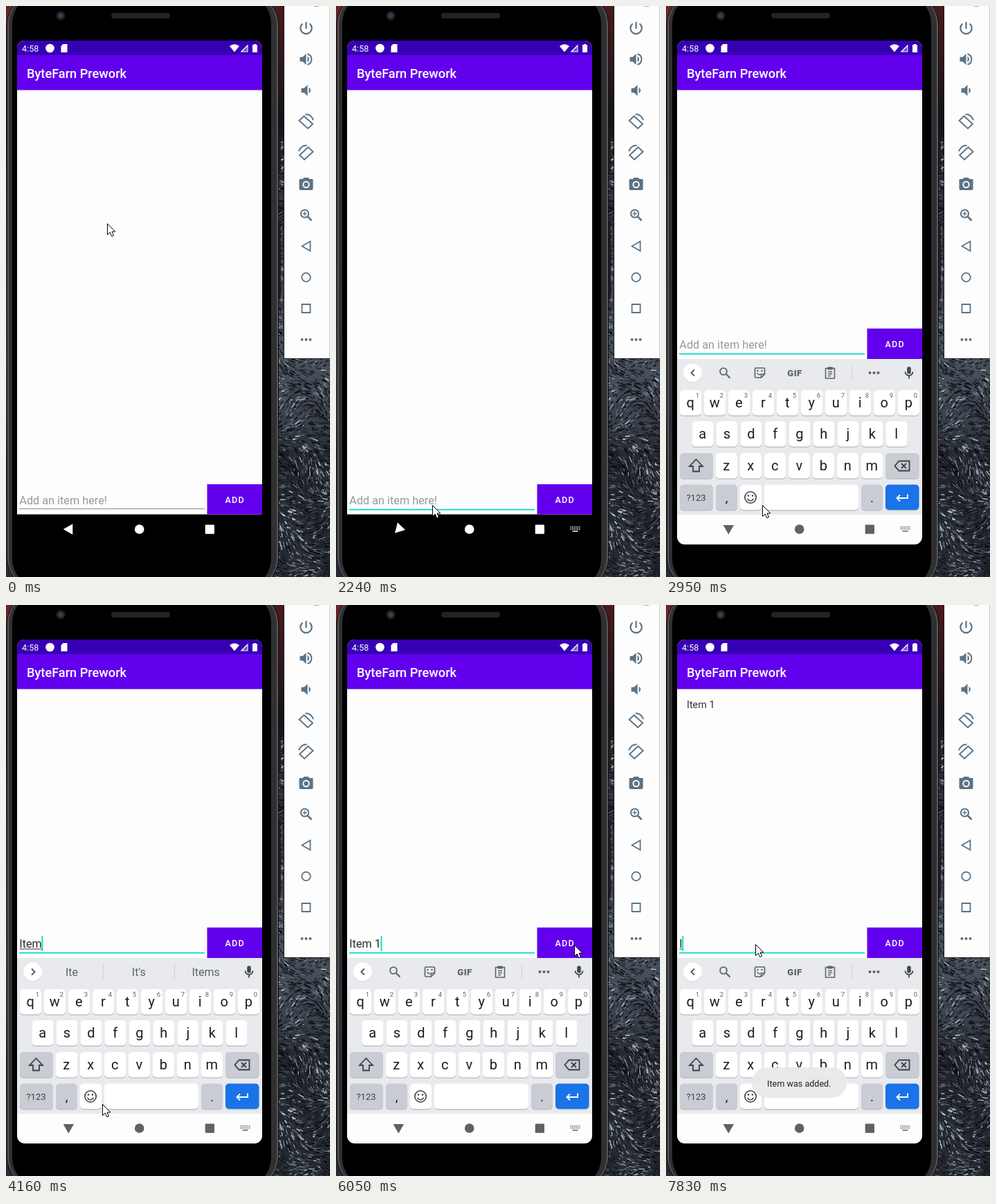
Recreate the animation shown at these times as an HTML page with a canvas. Size 468 px wide and 825 px high, loop 8000 ms.

```html
<!DOCTYPE html>
<html lang="en">
<head>
<meta charset="utf-8">
<title>List app demo</title>
<style>
html, body { margin: 0; width: 100%; height: 100%; overflow: hidden; background: #000; }
canvas { display: block; width: 468px; height: 825px; }
</style>
</head>
<body>
<canvas id="stage" width="468" height="825"></canvas>
<script>
const W = 468, H = 825, LOOP = 8000;
const TEAL = '#03dac5', PURPLE = '#6200ee', SLATE = '#5b7386', GREY = '#5f6368';
const stage = document.getElementById('stage').getContext('2d');
let c = stage;

// Drawing helpers
function box(x, y, w, h, fill, r = 0) {
  c.fillStyle = fill;
  c.beginPath();
  c.roundRect(x, y, w, h, r);
  c.fill();
}
function disc(x, y, r, fill) {
  c.fillStyle = fill;
  c.beginPath();
  c.arc(x, y, r, 0, Math.PI * 2);
  c.fill();
}
function ring(x, y, r, color, width) {
  c.strokeStyle = color;
  c.lineWidth = width;
  c.beginPath();
  c.arc(x, y, r, 0, Math.PI * 2);
  c.stroke();
}
function shape(x, y, d, fill, stroke, width = 2, angle = 0) {
  const path = new Path2D(d);
  c.save();
  c.translate(x, y);
  c.rotate(angle);
  if (fill) { c.fillStyle = fill; c.fill(path); }
  if (stroke) { c.strokeStyle = stroke; c.lineWidth = width; c.stroke(path); }
  c.restore();
}
function text(s, x, y, size, color, { weight = 400, align = 'left', spacing = 0 } = {}) {
  c.font = `${weight} ${size}px Roboto, sans-serif`;
  c.textAlign = align;
  c.letterSpacing = spacing + 'px';
  c.fillStyle = color;
  c.fillText(s, x, y);
  const width = c.measureText(s).width;
  c.letterSpacing = '0px';
  return width;
}
function dots(x, y, gap, r, color) {
  for (const i of [-1, 0, 1]) disc(x + i * gap, y, r, color);
}

// Value of the last step that has been reached: [time, ...values]
const step = (t, steps) => steps.findLast(s => s[0] <= t);
const between = (t, a, b) => t >= a && t < b;

function seeded(seed) {
  return () => (seed = (seed * 16807) % 2147483647) / 2147483647;
}

// Static parts
function drawWallpaper() {
  const rnd = seeded(77);
  const g = c.createLinearGradient(0, 0, 0, H);
  [[0, '#4a1a1c'], [.1, '#30171a'], [.2, '#121318'], [.32, '#2a2e36'], [.62, '#4a525e'], [.72, '#3c434e'], [.8, '#20242c'], [1, '#262b34']]
    .forEach(([p, color]) => g.addColorStop(p, color));
  c.fillStyle = g;
  c.fillRect(0, 0, W, H);
  box(0, 0, 20, 24, '#6a2426');

  // Fine brush strokes following a slow flow, grouped into light and dark patches
  for (let i = 0; i < 4200; i++) {
    const x = 383 + rnd() * 87, y = 190 + rnd() * 640;
    const flow = Math.sin(x * .045 + y * .02) + Math.sin(y * .05 - x * .03);
    const patch = .42 + .16 * Math.sin(x * .07 - y * .035) + .1 * Math.sin(y * .025 + 2.2);
    const light = Math.max(0, Math.min(1, patch + (rnd() + rnd() - 1) * .75));
    const len = 2 + rnd() * 7, a = .25 + flow * .65;
    const v = 8 + 185 * light * light;
    c.strokeStyle = `rgb(${v}, ${v * 1.05 + 2}, ${v * 1.1 + 6})`;
    c.lineWidth = .7 + rnd() * 1.1;
    c.beginPath();
    c.moveTo(x, y);
    c.lineTo(x + Math.cos(a) * len, y + Math.sin(a) * len);
    c.stroke();
  }
}

function drawPhone() {
  box(391, 195, 6, 46, '#1d1d1f', 2);
  box(391, 310, 6, 114, '#1d1d1f', 2);
  box(1, -22, 393, 868, '#0f0f10', 50);
  box(2, -21, 391, 866, '#58585b', 49);
  box(4, -20, 387, 864, '#303033', 47);
  box(9, -17, 374, 858, '#000', 42);
  box(152, 10, 85, 8, '#232323', 4);
  disc(79, 14, 6.5, '#202124');
  disc(79, 14, 3.5, '#394049');
}

function drawPanel() {
  box(401, 0, 67, 510, '#14161a');
  box(402, 0, 65, 509, '#fdfdfd');
  box(467, 0, 1, 509, '#c9cbce');
  box(445, 0, 7, 1, '#a9afb4');
  const x = 433.5;
  const speaker = 'M-9 -3.2H-5L0 -8V8L-5 3.2H-9Z';
  const wave = 'M2 -4.5Q7 0 2 4.5Z';
  shape(x, 32, 'M-5 -6.5A8.2 8.2 0 1 0 5 -6.5M0 -9V1', null, SLATE, 2.2);
  shape(x, 77, speaker + wave, SLATE);
  shape(x, 77, 'M2 -7.7A8 8 0 0 1 2 7.7', null, SLATE, 2);
  shape(x + 2, 122, speaker + wave, SLATE);
  const turn = 'M-3 -8L9.5 3.5L2.5 10L-10 -1.5ZM-1 -10.5Q7 -11 10.5 -2';
  shape(x, 167, turn, null, SLATE, 1.9);
  c.save();
  c.translate(x, 212);
  c.scale(-1, 1);
  shape(0, 0, turn, null, SLATE, 1.9);
  c.restore();
  shape(x, 257, 'M-9 -7H-5L-3 -9H3L5 -7H9Q10 -7 10 -6V7Q10 9 8 9H-8Q-10 9 -10 7V-6Q-10 -7 -9 -7Z', SLATE);
  disc(x, 258, 5.2, '#fdfdfd');
  disc(x, 258, 3.2, SLATE);
  ring(x - 2, 300, 5.6, SLATE, 2);
  shape(x, 302, 'M2.5 2.5L8 8', null, SLATE, 2.6);
  shape(x - 2, 300, 'M-3 0H3M0 -3V3', null, SLATE, 1.3);
  shape(x, 347, 'M-6 0L6 -7V7Z', null, SLATE, 1.8);
  ring(x, 392, 6.3, SLATE, 1.8);
  shape(x, 437, 'M-6 -6H6V6H-6Z', null, SLATE, 1.8);
  dots(x, 482, 6, 2, SLATE);
}

function drawScreen() {
  box(16, 50, 354, 684.5, '#fdfdfd', [11, 11, 0, 0]);
  box(16, 50, 354, 22, '#3700b3', [11, 11, 0, 0]);
  box(16, 71, 354, 50.5, PURPLE);
  text('4:58', 23, 65.5, 12.6, '#fff');
  disc(63.5, 61, 6.3, '#fff');
  shape(84, 61, 'M-1.5 -6H4.5V6H-4.5V-3Z', '#fff');
  shape(330, 61, 'M0 5.5L-7 -3Q0 -8.5 7 -3Z', '#fff');
  shape(344, 61, 'M-5.5 5.5L5.5 -5.5V5.5Z', '#fff');
  shape(344, 61, 'M-2.5 4.5L4.5 -2.5V4.5Z', '#7650cc');
  shape(359.5, 61, 'M-1.5 -6H1.5V-5H3.5V6H-3.5V-5H-1.5Z', '#fff');
  text('ByteFarn Prework', 30, 104, 18.2, '#fff', { weight: 500 });
}

function makeBackdrop() {
  const layer = document.createElement('canvas');
  layer.width = W;
  layer.height = H;
  c = layer.getContext('2d');
  drawWallpaper();
  drawPhone();
  drawPanel();
  drawScreen();
  c = stage;
  return layer;
}

// Keyboard
function key(x, y, w, fill = '#fff') {
  box(x, y + 1, w, 37, '#bfc1c7', 5);
  box(x, y, w, 36.5, fill, 5);
}

function drawKeys(upper) {
  const ink = '#1b1c1e', dark = '#c9ccd3';
  const rows = [['qwertyuiop', 20, 555], ['asdfghjkl', 37.5, 600], ['zxcvbnm', 72, 646]];
  for (const [letters, left, y] of rows) {
    [...letters].forEach((ch, i) => {
      const x = left + i * 35;
      key(x, y, 31);
      text(upper ? ch.toUpperCase() : ch, x + 15.3, y + 25, 20, ink, { align: 'center' });
      if (y === 555) text(String((i + 1) % 10), x + 25.5, y + 11, 9.5, GREY, { align: 'center' });
    });
  }
  key(20, 646, 48, dark);
  shape(43.5, 664, 'M0 -9L9.5 1H4.5V8.5H-4.5V1H-9.5Z', upper ? '#3c4043' : null, '#3c4043', 1.8);
  key(317, 646, 48.5, dark);
  shape(341.5, 664.5, 'M-5 -7H10V7H-5L-11 0ZM-1.5 -3.5L5.5 3.5M5.5 -3.5L-1.5 3.5', null, '#3c4043', 1.8);
  key(20, 691.5, 48, dark);
  text('?123', 43.5, 715, 13, '#3c4043', { align: 'center' });
  key(72, 691.5, 31, dark);
  text(',', 87.5, 717, 19, ink, { align: 'center' });
  key(107, 691.5, 31);
  ring(122, 710, 8.2, '#3c4043', 1.6);
  disc(119, 707.5, 1.3, '#3c4043');
  disc(125, 707.5, 1.3, '#3c4043');
  shape(122, 710, 'M-4.5 2Q0 8 4.5 2', null, '#3c4043', 1.6);
  key(142, 691.5, 136);
  key(282, 691.5, 31, dark);
  text('.', 297.5, 717, 19, ink, { align: 'center' });
  key(317, 691.5, 48.5, '#1a73e8');
  shape(341, 710, 'M8 -4.5V1H-7M-3 -3.5L-7.5 1L-3 5.5', null, '#fff', 1.9);
}

function drawToolbar(words) {
  disc(38.5, 531, 13.6, '#d4d6da');
  disc(38.5, 530, 13.5, '#fff');
  shape(39, 530, words ? 'M-2 -4.5L2.5 0L-2 4.5' : 'M2 -4.5L-2.5 0L2 4.5', null, '#55595e', 1.9);
  shape(351, 530, 'M-2.8 -6A2.8 2.8 0 0 1 2.8 -6V-1A2.8 2.8 0 0 1 -2.8 -1Z', '#44484c');
  shape(351, 530, 'M-5.5 -1.5A5.5 5.5 0 0 0 5.5 -1.5M0 4V8.5', null, '#44484c', 1.8);
  if (words) {
    words.forEach((word, i) => text(word, 95 + i * 96.8, 536, 16, GREY, { align: 'center' }));
    box(140, 519, 1, 22, '#cdd0d5');
    box(243, 519, 1, 22, '#cdd0d5');
    return;
  }
  ring(83, 528, 4.9, GREY, 1.9);
  shape(85, 530, 'M2 2L7.5 7.5', null, GREY, 2.2);
  shape(135.5, 530, 'M-5.5 -7H5.5Q7 -7 7 -5.5V2L2 7H-5.5Q-7 7 -7 5.5V-5.5Q-7 -7 -5.5 -7ZM7 2H2V7', null, GREY, 1.7);
  disc(132.5, 527, 1.2, GREY);
  disc(138.5, 527, 1.2, GREY);
  shape(135.5, 530, 'M-4 0Q-2 4 1 2', null, GREY, 1.5);
  text('GIF', 186, 534.5, 13, GREY, { weight: 900, align: 'center', spacing: .5 });
  shape(237, 530, 'M-6.5 -6.5H6.5V8H-6.5ZM-3 -1.5H3M-3 1.5H3M-3 4.5H1', null, GREY, 1.6);
  box(233, 521.5, 8, 4, GREY, 1);
  box(268, 520, 1, 20, '#cdd0d5');
  dots(300.5, 530, 6, 2, GREY);
}

function drawKeyboard(t) {
  box(16, 510, 354, 225, '#e8eaed');
  box(16, 735, 354, 43, '#fdfdfd', [0, 0, 11, 11]);
  const words = step(t, [
    [0, null], [3740, ['I', 'I\'m', 'It']], [3950, ['It', 'It\'s', 'Its']],
    [4160, ['Ite', 'It\'s', 'Items']], [4310, ['Item', 'Items', 'It\'s']],
    [4440, ['is', 'for', 'number']], [4860, null]
  ])[1];
  drawToolbar(words);
  drawKeys(between(t, 3350, 3540));
}

function drawNav(t) {
  const color = t < 2800 ? '#fff' : '#606164';
  const angle = -step(t, [[0, 0], [1960, .25], [2240, .8], [2370, Math.PI / 2]])[1];
  shape(90.3, 756, 'M-7.5 0L6 -7.7V7.7Z', color, null, 0, angle);
  disc(192.7, 756, 6.8, color);
  box(287.7, 749.5, 13.3, 13.3, color, 1);
  if (t < 1960) return;
  for (let row = 0; row < 2; row++) {
    for (let i = 0; i < 6; i++) box(338.5 + i * 2.5, 752 + row * 2.8, 1.4, 1.6, color);
  }
  box(341.5, 758, 8, 1.5, color);
}

// Input row
function drawInput(t) {
  const y = t < 2670 ? 0 : -225;
  const focused = t >= 1400;
  const value = step(t, [
    [0, ''], [3540, 'I'], [3740, 'It'], [3950, 'Ite'], [4160, 'Item'],
    [4440, 'Item '], [4860, 'Item 1'], [6340, ''], [7830, 'I']
  ])[1];
  const caret = step(t, [
    [0, 0], [1400, 1], [1960, 0], [2370, 1], [2950, 0], [3350, 1], [5390, 0],
    [5920, 1], [6800, 0], [7280, 1], [7550, 0], [7830, 1]
  ])[1];
  const width = value
    ? text(value, 19.3, 720 + y, 16.2, '#2a2a2a')
    : (text('Add an item here!', 19.3, 720 + y, 16.25, '#999'), 0);
  if (value && (t < 4440 || t >= 7830)) box(19.5, 721.5 + y, width, 1, '#333');
  if (focused) box(19, 726.8 + y, 268, 1.8, TEAL);
  else box(19, 726, 268, 1, '#8a8a8a');
  if (caret) box(19 + width, 703 + y, 1.8, 22, TEAL);
  box(290.5, 691 + y, 79.5, t < 2670 ? 43.5 : 44, PURPLE);
  text('ADD', 316.5, 717.7 + y, 12.6, '#fff', { weight: 500, spacing: 1.15 });
}

function drawToast(t) {
  const alpha = step(t, [[0, 0], [6490, .35], [6640, .8], [6800, 1]])[1];
  if (!alpha) return;
  c.globalAlpha = alpha;
  box(124, 668, 137.5, 44, 'rgba(234,234,236,.96)', 22);
  text('Item was added.', 192.3, 696, 12.6, '#222', { align: 'center' });
  c.globalAlpha = 1;
}

function cursorAt(t) {
  if (t >= 5390 && t < 6340) {
    const n = Math.min(6, Math.floor((t - 5390) / 132) + 1) / 6;
    const p = n * n * (3 - 2 * n);
    return [139 + 205 * p, 721 - 230 * p];
  }
  return step(t, [
    [0, 146, 314], [120, 146, 330], [260, 144, 415], [400, 142, 525], [550, 125, 592],
    [690, 122, 672], [840, 139, 721], [6340, 344, 491], [6800, 318, 489], [6960, 240, 486],
    [7120, 165, 489], [7280, 131, 492], [7430, 129, 490]
  ]).slice(1);
}

function drawCursor(t) {
  const [x, y] = cursorAt(t);
  shape(Math.round(x) + .5, Math.round(y) + .5, 'M0 0V16L3.7 12.5L6.2 18.2L9 17L6.5 11.5H11.3Z', '#fff', '#000', 1);
}

const backdrop = makeBackdrop();

function frame() {
  const t = performance.now() % LOOP;
  c.drawImage(backdrop, 0, 0);
  if (t >= 6340) text('Item 1', 30, 149, 14.4, '#333');
  drawInput(t);
  if (t >= 2950) drawKeyboard(t);
  drawNav(t);
  drawToast(t);
  drawCursor(t);
  requestAnimationFrame(frame);
}
frame();
</script>
</body>
</html>
```
